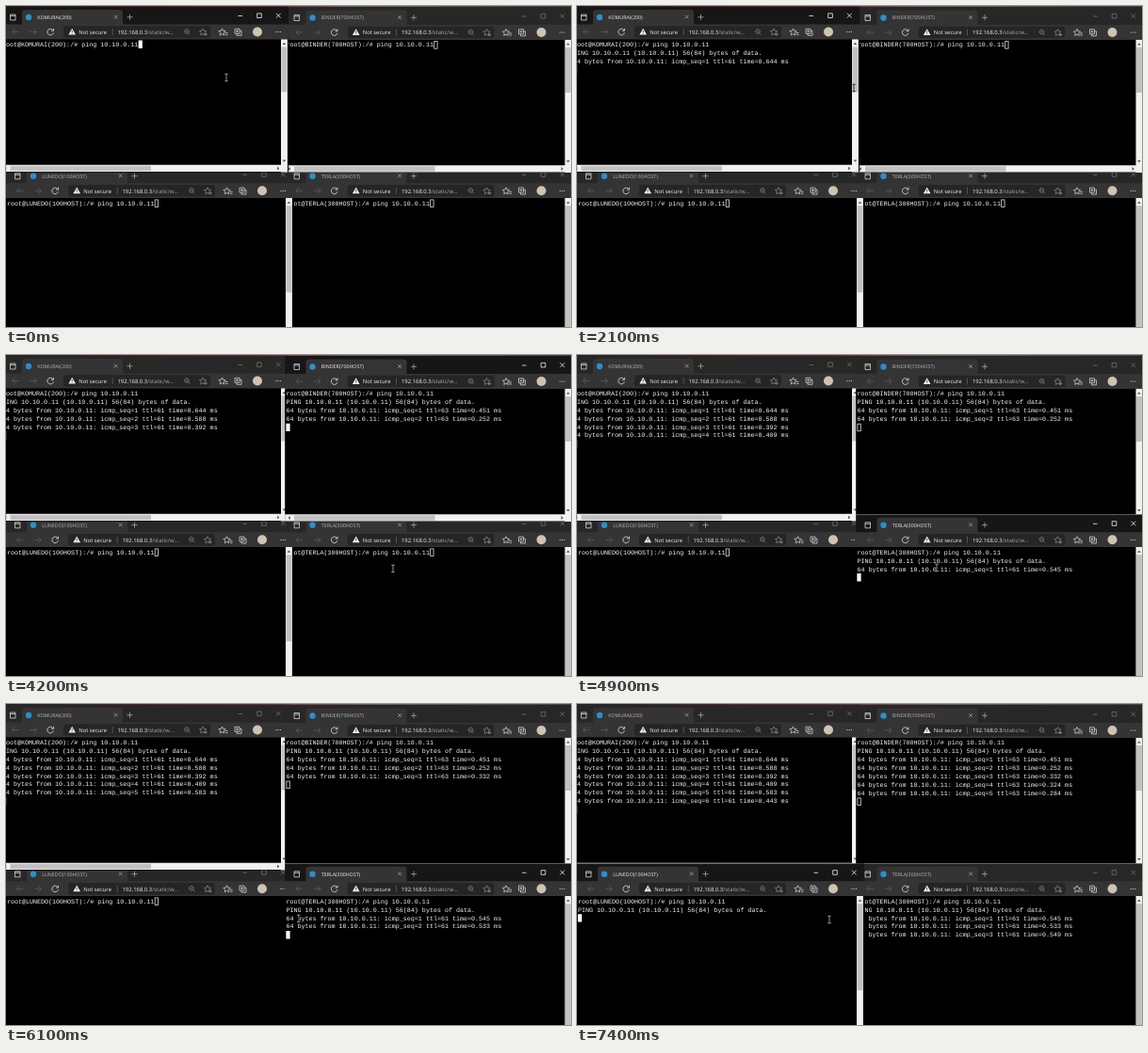
Recreate the animation shown at these times as an HTML page with a canvas. Size 600 by 341 pixels, loop 8000 ms.

```html
<!DOCTYPE html>
<html lang="en">
<head>
<meta charset="utf-8">
<title>Four ping terminals</title>
<style>
  html, body { margin: 0; width: 100%; height: 100%; overflow: hidden; background: #000; }
  canvas { display: block; width: 600px; height: 341px; }
</style>
</head>
<body>
<canvas id="stage" width="600" height="341"></canvas>
<script>
const ctx = document.getElementById('stage').getContext('2d');
const DURATION = 8000, STEP = 100;
const CHAR = 4.02, LINE = 8.9, BASELINE = 43.4;
const LEFT = -0.9, WIDTH = 305.7, CONTENT = 35.7, BOTTOM = 177;
const MONO = '6.7px "Liberation Mono", monospace';
const sans = size => `${size}px "Open Sans", sans-serif`;

// "off" is the span in which the blinking cursor is hidden.
const windows = {
  a: { x: -4.5, y: -0.5, host: 'KOMURAI(200)', ttl: 61, enter: 1500, off: [300, 1000], thumb: 92, short: true,
       replies: [[1500, '0.644'], [2500, '0.588'], [3500, '0.392'], [4500, '0.409'], [5600, '0.583'], [6600, '0.443']] },
  b: { x: 297, y: 0, host: 'BINDER(700HOST)', ttl: 63, enter: 3100, off: [3300, 3800], thumb: 92, short: true,
       replies: [[3100, '0.451'], [4200, '0.252'], [5200, '0.332'], [6300, '0.324'], [7300, '0.284']] },
  c: { x: 0.5, y: 168.3, host: 'LUNEDO(100HOST)', ttl: 61, enter: 7400, off: [6800, 7400], thumb: 136, replies: [] },
  d: { x: 297, y: 168.3, host: 'TERLA(300HOST)', ttl: 61, enter: 4900, off: [5000, 5700], thumb: 173,
       replies: [[4900, '0.545'], [6000, '0.533'], [7000, '0.549']] },
};

// Stacking order, back to front; the last window has focus.
const stacking = [[0, 'dcba'], [2500, 'dcab'], [4300, 'cabd'], [6300, 'abdc']];

const pointerPath = [
  [0, 234, 76], [100, 240, 78], [300, 265, 88], [2000, 265, 88], [2100, 294, 87],
  [2500, 354, 88], [2600, 354, 88], [2800, 354, 84], [3400, 354, 84], [4200, 411, 227],
  [4300, 382, 226], [5600, 382, 226], [6400, 268, 229], [DURATION, 268, 229],
];

const star = (x, y) => `M${x} ${y - 3.5}l1.1 2.3 2.5.3-1.8 1.8.4 2.5-2.2-1.2-2.2 1.2.4-2.5-1.8-1.8 2.5-.3z`;
const icons = {
  tabs: 'M9 9.5h5.5v6h-5.5zM9 11h5.5',
  tabButtons: 'M119.3 10.3l3.6 3.6m0-3.6l-3.6 3.6M133 12.3h6m-3-3v6',
  frameButtons: 'M251 11h4.5M271.2 8.4h4.6v4.6h-4.6zM291.4 8.3l4.8 4.8m0-4.8l-4.8 4.8',
  history: 'M18 28h-7m3-3l-3 3 3 3M30 28h7m-3-3l3 3-3 3',
  reload: 'M54.6 26.5a3.3 3.3 0 1 0 .3 2.4M55 24.4v2.4h-2.4',
  address: 'M198 29.2a2.3 2.3 0 1 0-3.3-3.2 2.3 2.3 0 0 0 3.3 3.2l1.8 1.8M195.2 27.6h2.4' +
    star(213.5, 28) + 'M215 30.5h3.4m-1.7-1.7v3.4',
  tools: star(234, 28) + 'M237 29h3m-2.5 2h2.5M247.5 24.8h5v5h-5zM249.5 29.8v2h5v-5h-2M248.6 27.3h2.8m-1.4-1.4v2.8',
};

function box(x, y, w, h, color, radius = 0) {
  ctx.fillStyle = color;
  ctx.beginPath();
  ctx.roundRect(x, y, w, h, radius);
  ctx.fill();
}

function disc(x, y, r, color) {
  box(x - r, y - r, 2 * r, 2 * r, color, r);
}

function shape(path, color, filled) {
  ctx.lineWidth = 0.8;
  ctx.fillStyle = ctx.strokeStyle = color;
  filled ? ctx.fill(new Path2D(path)) : ctx.stroke(new Path2D(path));
}

function label(str, x, y, font, color) {
  ctx.font = font;
  ctx.fillStyle = color;
  ctx.fillText(str, x, y);
}

function drawChrome(win, focused) {
  box(LEFT, 1, WIDTH, 20, focused ? '#161617' : '#272727');
  box(21.5, 4.5, 107, 18, '#343435', [3, 3, 0, 0]);
  box(LEFT, 20, WIDTH, CONTENT - 20, '#343435');
  shape(icons.tabs, '#d5d5d5');
  disc(28.5, 12.5, 3.2, '#2b8fcb');
  label(win.host, 37.8, 14.2, sans(5.3), focused ? '#f2f2f2' : '#b8b8b8');
  shape(icons.tabButtons, '#a5a5a5');
  shape(icons.frameButtons, focused ? '#f2f2f2' : '#707070');

  shape(icons.history, '#5c5c5c');
  shape(icons.reload, '#dedede');
  box(65.5, 21.7, 156, 12.6, '#252526', 3);
  shape('M74.7 24.2l3.8 6.8h-7.6z', '#f2f2f2', true);
  shape('M74.7 26.5v2.2m0 .6v.8', '#252526');
  label('Not secure', 81.7, 30.2, sans(5.9), '#f0f0f0');
  box(117.3, 24.5, 0.7, 7, '#666');
  label('192.168.0.3', 123, 30.2, sans(5.9), '#f0f0f0');
  label('/static/w...', 123 + ctx.measureText('192.168.0.3').width, 30.2, sans(5.9), '#a8a8a8');
  shape(icons.address, '#858585');
  shape(icons.tools, '#d0d0d0');
  disc(271.5, 28, 5, '#cfc4b2');
  for (const dx of [-2.3, 0, 2.3]) disc(293.7 + dx, 28, 0.6, '#e6e6e6');
}

function drawScrollbars(win) {
  box(296.5, CONTENT, 6.9, 180, '#f1f1f1');
  shape('M298 41.5l1.9-2.2 1.9 2.2z', '#555', true);
  box(297, 44, 5.9, win.thumb - 44, '#c1c1c1');
  if (!win.short) return;
  shape('M298 164l1.9 2.2 1.9-2.2z', '#555', true);
  box(LEFT, 169.2, 304.3, 7.2, '#f1f1f1');
  box(9, 170.2, 149.5, 5.6, '#c1c1c1');
  shape('M4.8 171.1v3.8l-2.2-1.9zM292.6 171.1v3.8l2.2-1.9z', '#555', true);
}

function drawTerminal(win, t, focused) {
  const command = `root@${win.host}:/# ping 10.10.0.11`;
  const lines = [command];
  if (t >= win.enter) lines.push('PING 10.10.0.11 (10.10.0.11) 56(84) bytes of data.');
  win.replies.forEach(([at, ms], i) => {
    if (t >= at) lines.push(`64 bytes from 10.10.0.11: icmp_seq=${i + 1} ttl=${win.ttl} time=${ms} ms`);
  });
  box(LEFT, CONTENT, WIDTH, 180, '#000');
  lines.forEach((line, i) => label(line, 0.4, BASELINE + i * LINE, MONO, '#f4f4f4'));

  const typing = lines.length === 1;
  const x = 0.4 + (typing ? command.length * CHAR : 0);
  const y = BASELINE - 6.3 + (typing ? 0 : lines.length) * LINE;
  if (!focused) {
    ctx.lineWidth = 0.8;
    ctx.strokeStyle = '#e0e0e0';
    ctx.strokeRect(x + 0.5, y + 0.5, 3.4, 7.6);
  } else if (t < win.off[0] || t >= win.off[1]) {
    box(x, y, 4.2, 8.4, '#fff');
  }
}

function drawWindow(win, t, focused) {
  ctx.save();
  ctx.translate(win.x, win.y);
  ctx.beginPath();
  ctx.rect(LEFT, 1, WIDTH, win.short ? BOTTOM - 1 : 341);
  ctx.clip();
  drawTerminal(win, t, focused);
  drawScrollbars(win);
  drawChrome(win, focused);
  ctx.restore();
}

function drawDesktop() {
  const strip = ctx.createLinearGradient(0, 0, 600, 0);
  ['#2a2020', '#7a2a24', '#6b5a55', '#4a4040'].forEach((color, i) => strip.addColorStop(i / 3, color));
  box(0, 0, 600, 341, strip);
}

function drawPointer(t) {
  const i = pointerPath.findIndex(key => key[0] > t);
  const [t0, x0, y0] = pointerPath[i - 1], [t1, x1, y1] = pointerPath[i];
  const k = (t - t0) / (t1 - t0);
  ctx.save();
  ctx.globalCompositeOperation = 'difference';
  ctx.translate(x0 + (x1 - x0) * k, y0 + (y1 - y0) * k);
  shape('M-1.8-3.8h1.3l.5.5.5-.5h1.3M0-3.3v6.6M-1.8 3.8h1.3l.5-.5.5.5h1.3', '#b4b4b4');
  ctx.restore();
}

function draw(now) {
  const t = Math.floor(now % DURATION / STEP) * STEP;
  const order = stacking.filter(([at]) => at <= t).pop()[1];
  ctx.textRendering = 'geometricPrecision';
  drawDesktop();
  for (const id of order) drawWindow(windows[id], t, id === order[3]);
  drawPointer(t);
  requestAnimationFrame(draw);
}
requestAnimationFrame(draw);
</script>
</body>
</html>
```
